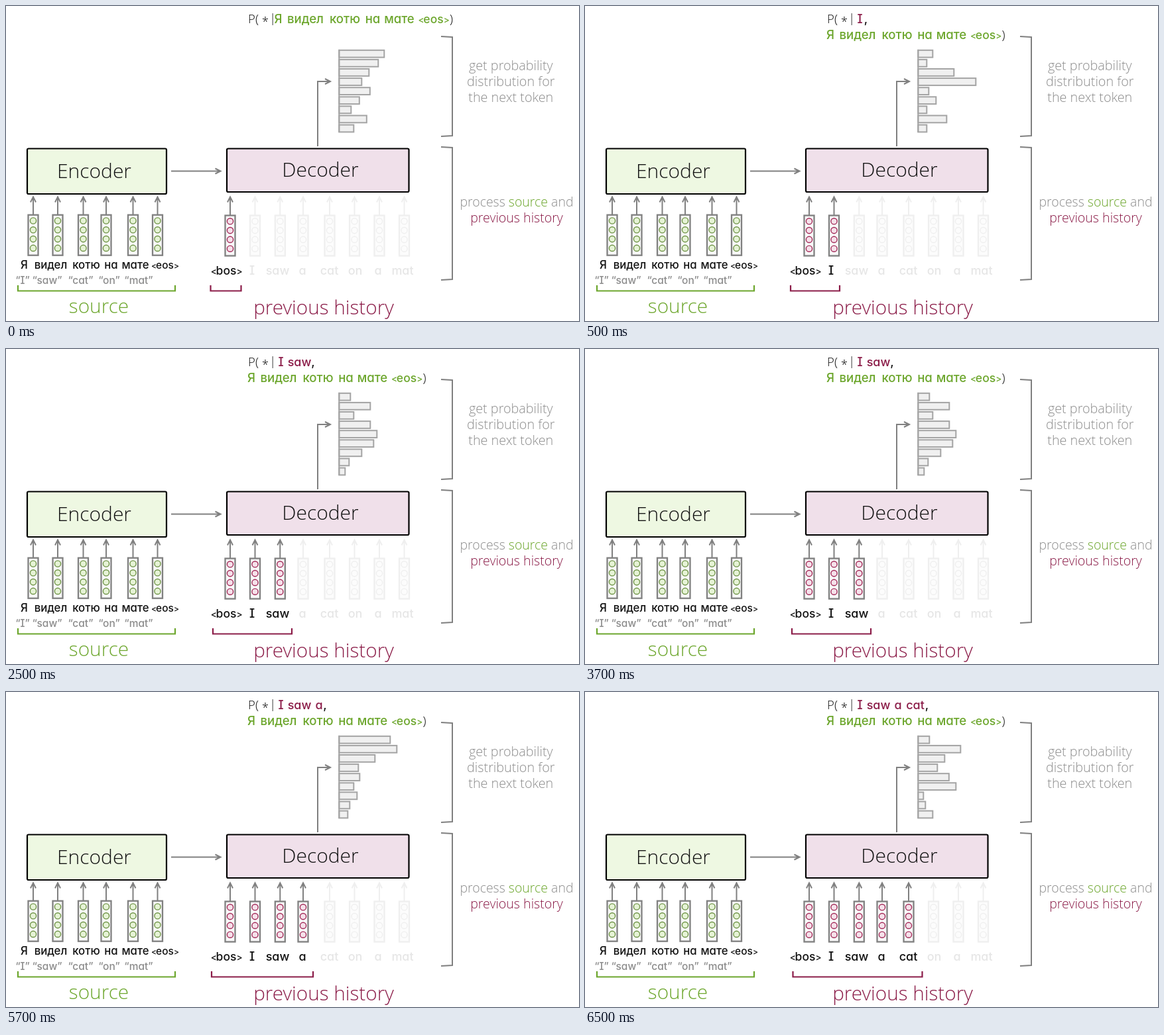
Recreate the animation shown at these times as an HTML page. Size 864 by 476 pixels, loop 8000 ms.

```html
<!DOCTYPE html>
<html lang="en">
<head>
<meta charset="utf-8">
<title>Encoder and decoder</title>
<style>
html, body { margin: 0; width: 100%; height: 100%; overflow: hidden; background: #fff; }
svg { display: block; width: 100vw; height: 100vh; }
text { white-space: pre; font: 350 20px "Open Sans", "Noto Sans", sans-serif; text-anchor: middle; }
.hand { font-family: Inter, "Open Sans", sans-serif; font-weight: 500; font-feature-settings: "cv08", "cv11"; }
.hand tspan { font-size: 78%; letter-spacing: -.09em; }
</style>
</head>
<body>
<svg viewBox="0 0 864 476"><g id="still"></g><g id="live"></g></svg>
<script>
const GREEN = '#6ca62c', RED = '#8b1c48', GRAY = '#808080', NOTE = '#8c8c8c';
const LOOP = 8000;
const STARTS = [0, 500, 2500, 4500, 6500];
const BARS = [
  [68, 59, 45, 34, 46.5, 30.5, 18, 41.5, 22],
  [22, 13, 54, 87, 16, 27, 13, 43, 13],
  [17, 47, 22, 47, 57, 52, 34, 15, 9],
  [77, 87, 54, 29, 31, 22, 27, 16, 13],
  [17, 64, 40, 29, 46.5, 57, 8, 11, 22]
];
const BRACKETS = [[308.5, 354.5], [310, 384], [312, 431], [310, 463], [313.5, 508.5]];
const SOURCE = [['Я', 370], ['видел', 411], ['котю', 470.5], ['на', 512.5], ['мате', 552.5], ['<eos>', 604]];
const SAID = [['I', 414.5], ['saw', 442.5], ['a', 472], ['cat', 498]];
const COMMAS = [423.5, 463, 481, 515.5];
const TOKENS = [['<bos>', 332, 338], ['I', 371, 375.5], ['saw', 409.5, 413.3], ['a', 447, 448],
  ['cat', 487.5, 488], ['on', 526.5, 525.5], ['a', 561, 563], ['mat', 598, 600.5]];

const text = (s, x, y, size, color, extra = '') =>
  `<text x="${x}" y="${y}" style="font-size:${size}px" fill="${color}" ${extra}>${s}</text>`;
const hand = (s, x, y, size, color) =>
  text(s.replace(/[<>]/g, c => `<tspan>${c === '<' ? '&lt;' : '&gt;'}</tspan>`), x, y, size, color, 'class="hand"');
const path = (d, color = GRAY, width = 2) =>
  `<path d="${d}" fill="none" stroke="${color}" stroke-width="${width}"/>`;
const box = (x, y, w, h, fill, stroke, width, r = 0) =>
  `<rect x="${x}" y="${y}" width="${w}" height="${h}" rx="${r}" fill="${fill}" stroke="${stroke}" stroke-width="${width}"/>`;
const under = (a, b, color) => path(`M${a} 422V430.5H${b}V422`, color, 2.2);

function token(x, y, stroke, dot, fill, back) {
  let out = path(`M${x} ${y}V289M${x - 4} 296.5L${x} 288.5L${x + 4} 296.5`, stroke)
    + box(x - 7.5, y, 15, 61, back, stroke, 2.3);
  for (let i = 0; i < 4; i++)
    out += `<circle cx="${x}" cy="${y + 8.8 + 13.8 * i}" r="4.6" fill="${fill}" stroke="${dot}" stroke-width="1.4"/>`;
  return out;
}

function drawStill() {
  let out = box(32, 215.5, 210, 68.5, '#eef8e2', '#000', 2.2, 2)
    + box(333, 215.5, 274.5, 65.5, '#f0e0ea', '#000', 2.2, 2)
    + text('Encoder', 133, 260, 30, '#111') + text('Decoder', 474, 258, 30, '#111')
    + text('source', 140, 464, 29.8, GREEN) + text('previous history', 479, 466, 29.7, RED)
    + path('M249 249.5H323M315.5 245.5L323.5 249.5L315.5 253.5')
    + path('M470 212V114H488M481 110L489 114L481 118')
    + path('M656 46L673 47V196L656 197M656 213L673 214V413L656 414')
    + under(18, 255, GREEN);
  ['get probability', 'distribution for', 'the next token'].forEach((s, i) =>
    out += text(s, 761.3, 97 + 24 * i, 19.8, NOTE));
  out += text(`process <tspan fill="${GREEN}">source</tspan> and`, 770, 303, 19.5, NOTE)
    + text('previous history', 770, 327, 19.6, RED);

  [41, 78, 116.5, 151, 191.5, 228.5].forEach(x => out += token(x, 315.7, GRAY, '#6f9446', '#e6f3d6', '#f8f8f8'));
  [['Я', 27.5], ['видел', 67.5], ['котю', 121], ['на', 158.5], ['мате', 195], ['<eos>', 239.5]]
    .forEach(([s, x]) => out += hand(s, x, 396.5, s[0] === '<' ? 15.5 : 16.8, '#111'));
  [['I', 25], ['saw', 62], ['cat', 112.5], ['on', 155.5], ['mat', 200]]
    .forEach(([s, x]) => out += hand(`“${s}”`, x, 420, 15.5, NOTE));
  return out;
}

function drawStep(n) {
  const shift = n ? 0 : 40.5, y = n ? 50 : 26;
  let out = text('P(', 373, 26, 18.5, '#111') + text('*', 391, 30, 18, '#111') + text('|', 402, 25, 18, '#111')
    + text(')', 631 + shift, y, 18.5, '#111');
  SOURCE.forEach(([s, x]) => out += hand(s, x + shift, y, s[0] === '<' ? 17.5 : 18.6, GREEN));
  SAID.slice(0, n).forEach(([s, x]) => out += hand(s, x, 26, 18, RED));
  if (n) out += hand(',', COMMAS[n - 1], 26, 18, '#111');

  BARS[n].forEach((w, i) => out += box(502.3, 66.8 + 14.1 * i, w, 10.8, '#f0f0f0', '#a4a4a4', 2));
  out += path('M502.3 65.8V191', '#a4a4a4');

  TOKENS.forEach(([s, x, cx], i) => {
    const on = i <= n;
    out += on ? token(cx, 316.5, GRAY, '#a32a58', '#f5e1ea', '#f8f8f8')
      : token(cx, 316.5, '#efefef', '#efefef', '#fcfcfc', '#fcfcfc');
    out += hand(s, x, 406, s[0] === '<' ? 17.5 : 18, on ? '#111' : '#e6e6e6');
  });
  return out + under(...BRACKETS[n], RED);
}

const live = document.getElementById('live');
let shown = -1;

function tick() {
  const t = performance.now() % LOOP;
  const n = STARTS.filter(s => s <= t).length - 1;
  if (n !== shown) live.innerHTML = drawStep(shown = n);
  requestAnimationFrame(tick);
}

document.getElementById('still').innerHTML = drawStill();
tick();
</script>
</body>
</html>
```
